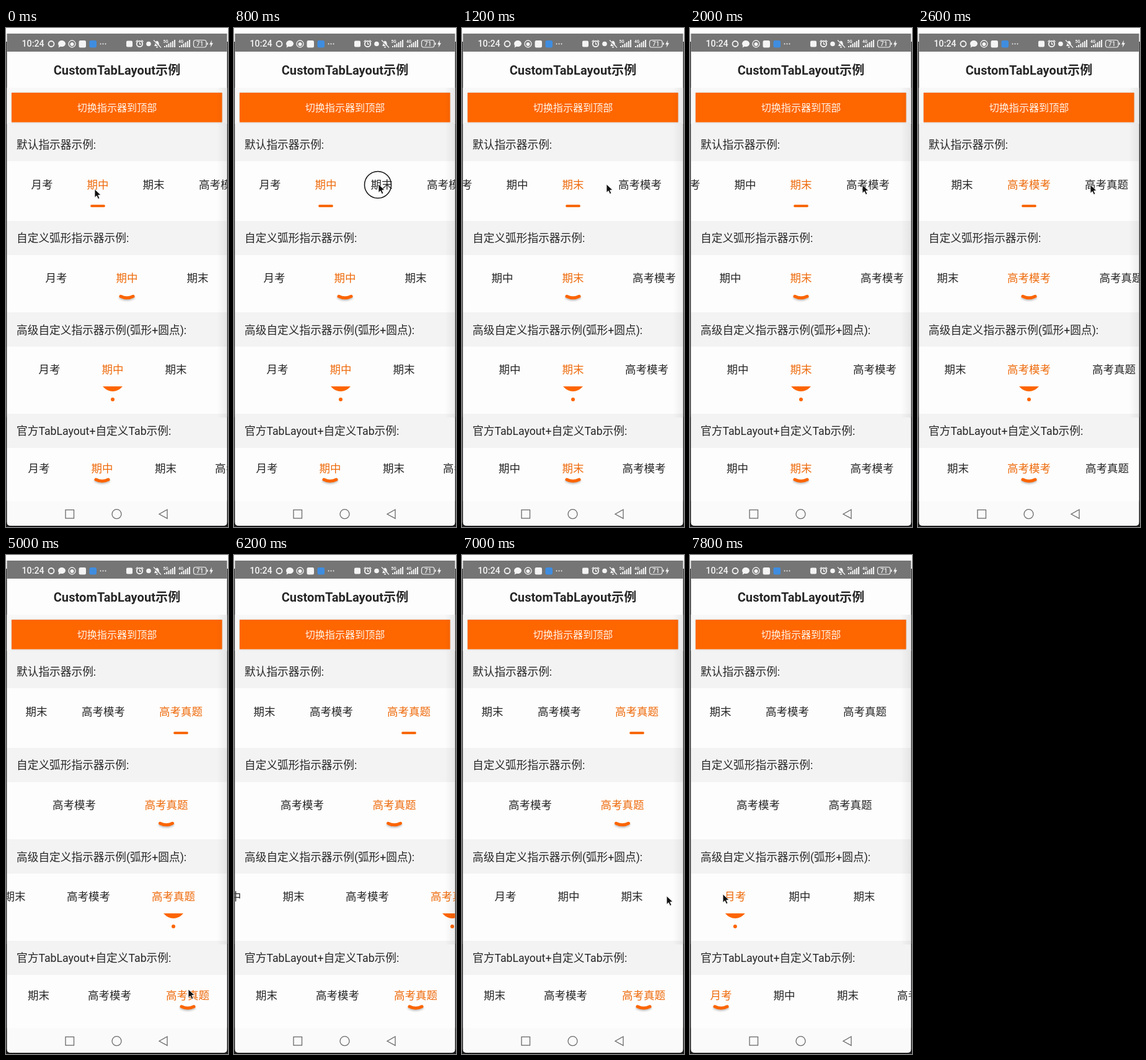
These frames come from a looping animation (358x802 px, 8 s). An HTML page:

```html
<!DOCTYPE html>
<html lang="zh-CN">
<head>
<meta charset="utf-8">
<title>CustomTabLayout示例</title>
<style>
  html, body { margin: 0; width: 100%; height: 100%; overflow: hidden; background: #fff; }
  svg { display: block; width: 100vw; height: 100vh; }
  text { font-family: Roboto, "Noto Sans CJK SC", "Noto Sans CJK", sans-serif; fill: #262626; }
  .heading { font-size: 17.7px; }
  .tab { font-size: 17.5px; text-anchor: middle; }
  .tab.on { fill: #ee6b0c; font-weight: 500; }
  .status text { fill: #f4f4f4; }
  .line { fill: none; stroke: #f4f4f4; }
  .arc { fill: none; stroke: #fb6500; stroke-width: 5; stroke-linecap: round; filter: drop-shadow(0 2px 1.5px rgba(0,0,0,.25)); }
</style>
</head>
<body>
<svg viewBox="0 0 358 802" preserveAspectRatio="none">
  <defs>
    <clipPath id="screen"><rect x="1.5" y="9" width="355" height="791"/></clipPath>
    <linearGradient id="edge">
      <stop offset="0" stop-color="#000" stop-opacity="0"/>
      <stop offset="1" stop-color="#000" stop-opacity=".06"/>
    </linearGradient>
  </defs>

  <rect width="358" height="802" fill="#fdfdfd"/>
  <rect y="22" width="358" height="603" fill="#333"/>
  <rect y="625" width="358" height="177" fill="#1d1d1f"/>
  <path d="M1.5 9h355v785q0 6-6 6h-343q-6 0-6-6z" fill="#fdfdfd"/>
  <rect x="1.5" y="9" width="355" height="29" fill="#757575"/>

  <g class="status" fill="#f4f4f4">
    <text x="25.5" y="30" font-size="14.2" font-weight="500">10:24</text>
    <circle class="line" cx="73" cy="25.5" r="4.5" stroke-width="1.8"/>
    <path d="M84 25a6 5 0 1 1 4 4.8l-3.5 1.7.8-3A5 5 0 0 1 84 25z"/>
    <circle class="line" cx="106.5" cy="25.5" r="5.5" stroke-width="1.3"/>
    <circle cx="106.5" cy="26" r="3"/>
    <rect x="117.5" y="20" width="11.5" height="11.5" rx="2.5"/>
    <rect x="134.5" y="20" width="11.5" height="11.5" rx="2.5" fill="#3f8de0"/>
    <path class="line" d="M152.5 25.5h0m4 0h0m4 0h0" stroke-width="2" stroke-linecap="round"/>
    <rect x="194" y="20.5" width="10" height="10" rx="2"/>
    <circle class="line" cx="215.5" cy="25.5" r="4.7" stroke-width="1.8"/>
    <path class="line" d="M215.5 22.5v3.5h2.5M209.5 22l3-2.5M221.5 22l-3-2.5" stroke-width="1.3"/>
    <circle cx="230" cy="25.5" r="3.8"/>
    <path d="M239 29q1.5-1.5 1.5-5 .5-3 3-3.5 2.5.5 3 3.5 0 3.5 1.5 5zM242 30h3v1.5h-3z"/>
    <path d="M237.5 20l12 12" stroke="#757575" stroke-width="2.2"/>
    <path class="line" d="M238 19.5l12 12" stroke-width="1.2"/>
    <text x="253.5" y="23.5" font-size="6.5" font-weight="700">5G</text>
    <text x="278" y="23.5" font-size="6.5" font-weight="700">4G</text>
    <g id="bars"></g>
    <rect class="line" x="302.5" y="19.5" width="20.5" height="11.5" rx="3.5" stroke-width="1.2"/>
    <path d="M324 23.5h1.5v3.5h-1.5z"/>
    <text x="312.8" y="29" font-size="10" font-weight="500" text-anchor="middle">71</text>
    <path d="M332 19.5l-4 7h2.5l-1 5 4.500-7.200h-2.700z"/>
  </g>

  <rect x="1.5" y="96" width="355" height="58" fill="#f8f8f8"/>
  <text x="179" y="74.5" font-size="20" font-weight="700" letter-spacing=".1" text-anchor="middle">CustomTabLayout示例</text>
  <g id="rows" clip-path="url(#screen)"></g>
  <rect x="9" y="104" width="339.5" height="47.5" fill="#fe6600" style="filter:drop-shadow(0 .5px 1.5px rgba(0,0,0,.16))"/>
  <text x="179" y="134" font-size="16.1" text-anchor="middle" style="fill:#fff4ea">切换指示器到顶部</text>
  <rect x="340" y="96" width="16.5" height="530" fill="url(#edge)"/>

  <rect x="2" y="761" width="354" height="37" fill="#fafafa"/>
  <g fill="none" stroke="#6b6b6b" stroke-width="1.3">
    <rect x="96" y="774.5" width="13.5" height="13.5"/>
    <circle cx="178.5" cy="781.2" r="7.5"/>
    <path d="M247 781.2l13-7.2v14.4z"/>
  </g>

  <circle id="press" r="21.5" fill="none" stroke="#111" stroke-width="1.5"/>
  <path id="pointer" d="M0 0v13.5l3.2-2.8 2.3 5 2.4-1.1-2.3-4.8 4.4-.3z" fill="#111" stroke="#fff" stroke-width=".8"/>
</svg>

<script>
const LOOP = 8000, STEP = 200, MIDDLE = 179;
const LABELS = ['月考', '期中', '期末', '高考模考', '高考真题'];
const CLICKS = [800, 2200, 4400, 7400];
const make = (parent, tag, attrs, text) => {
  const node = document.createElementNS('http://www.w3.org/2000/svg', tag);
  for (const key in attrs) node.setAttribute(key, attrs[key]);
  if (text) node.textContent = text;
  return parent.appendChild(node);
};
const byId = id => document.getElementById(id);
const clamp = (v, lo, hi) => Math.min(hi, Math.max(lo, v));
const mix = (a, b, k) => a + (b - a) * k;
const linear = k => k;
const easeOut = k => 1 - (1 - k) ** 3;
const smooth = k => k * k * (3 - 2 * k);
const progress = (t, from, length) => clamp((t - from) / length, 0, 1);

// Each key is [time, value, value...]
function track(keys, t, ease) {
  const next = keys.findIndex(key => key[0] > t);
  if (next < 0) return keys[keys.length - 1].slice(1);
  if (next === 0) return keys[0].slice(1);
  const a = keys[next - 1], b = keys[next];
  const k = ease((t - a[0]) / (b[0] - a[0]));
  return a.slice(1).map((v, i) => mix(v, b[i + 1], k));
}

const PAGE = [[0, 1], [800, 1], [1200, 2], [2200, 2], [2600, 3], [4400, 3], [4800, 4], [7400, 4], [7800, 0]];
const DRAG = [[5800, 260], [6200, 178], [6400, 150], [7000, 0]];
const POINTER = [[0, 143, 259], [200, 143, 259], [700, 233, 251], [1200, 233, 251], [1800, 278, 252],
  [3200, 278, 252], [4000, 294, 698], [5000, 294, 698], [5600, 270, 548], [5800, 280, 548],
  [6200, 364, 548], [6400, 200, 548], [7000, 330, 548], [7300, 53, 545]];

const arc = (g, y) => make(g, 'path', { class: 'arc', d: `M-10 ${y}Q0 ${y + 5} 10 ${y}` });
const ROWS = [
  { title: '默认指示器示例:', titleBase: 193.7, band: 152, top: 214, bottom: 310, base: 257.5,
    max: 189, tabs: [58, 148, 238, 346, 471],
    mark: g => make(g, 'path', { d: 'M-10 286H10', stroke: '#f76808', 'stroke-width': 3.8, 'stroke-linecap': 'round' }) },
  { title: '自定义弧形指示器示例:', titleBase: 344.3, band: 310, top: 365, bottom: 457, base: 408,
    max: 330, tabs: [81, 195, 309, 440, 588.5],
    mark: g => arc(g, 431.3) },
  { title: '高级自定义指示器示例(弧形+圆点):', titleBase: 491.5, band: 457, top: 512, bottom: 620, base: 555,
    max: 260, tabs: [70, 172, 274, 393, 530],
    mark: g => {
      make(g, 'path', { d: 'M-16 576H16Q9 584 0 584T-16 576z', fill: '#fd6500' });
      make(g, 'circle', { cy: 597, r: 3, fill: '#fd6500' });
    } },
  { title: '官方TabLayout+自定义Tab示例:', titleBase: 654, band: 620, top: 675, bottom: 760, base: 713.8,
    max: 205, tabs: [53, 155, 257.5, 372, 498],
    mark: g => arc(g, 725.8) }
];

for (const x of [255, 279])
  for (let i = 0; i < 6; i++)
    make(byId('bars'), 'rect', { x: x + i * 3.2, y: 29 - i * 2, width: 2, height: 2 + i * 2 });

for (const row of ROWS) {
  const g = byId('rows');
  make(g, 'rect', { x: 1.5, y: row.band, width: 355, height: row.top - row.band, fill: '#f3f3f3' });
  make(g, 'rect', { x: 1.5, y: row.top, width: 355, height: row.bottom - row.top, fill: '#fdfdfd' });
  make(g, 'text', { class: 'heading', x: 17, y: row.titleBase }, row.title);
  row.labels = LABELS.map(label => make(g, 'text', { class: 'tab', y: row.base }, label));
  row.marker = make(g, 'g', {});
  row.mark(row.marker);
}

// Value of a per-tab function at a fractional page
function between(valueAt, page) {
  const i = Math.min(LABELS.length - 2, Math.floor(page));
  return mix(valueAt(i), valueAt(i + 1), page - i);
}

function scrollOf(row, index, page, t) {
  if (index === 1 && t < 800) return mix(0, 16, easeOut(progress(t, 0, 400)));
  if (index === 2 && t >= 5800) return track(DRAG, t, linear)[0];
  if (t >= 7400) return index < 2 ? row.max : mix(row.max, 3, easeOut(progress(t, 7400, 400)));
  return between(i => clamp(row.tabs[i] - MIDDLE, 0, row.max), page);
}

function draw(t) {
  const page = track(PAGE, t, easeOut)[0];
  const selected = Math.round(page);
  ROWS.forEach((row, index) => {
    const scroll = scrollOf(row, index, page, t);
    const pull = index === 2 ? progress(t, 7400, 400) : 0;
    const place = x => (x - scroll) * (1 + .02 * pull) + 1.4 * pull;
    row.labels.forEach((label, i) => {
      label.setAttribute('x', place(row.tabs[i]));
      label.classList.toggle('on', i === selected);
    });
    row.marker.setAttribute('transform', `translate(${place(between(i => row.tabs[i], page))})`);
  });
  const [x, y] = track(POINTER, t, smooth);
  byId('pointer').setAttribute('transform', `translate(${x} ${y})`);
  byId('press').setAttribute('transform', `translate(${x - 1} ${y + 1})`);
  byId('press').style.display = CLICKS.some(c => t >= c && t < c + STEP) ? '' : 'none';
}

const start = performance.now();
function tick() {
  const t = (performance.now() - start) % LOOP;
  draw(Math.floor(t / STEP) * STEP);
  requestAnimationFrame(tick);
}
tick();
</script>
</body>
</html>
```
